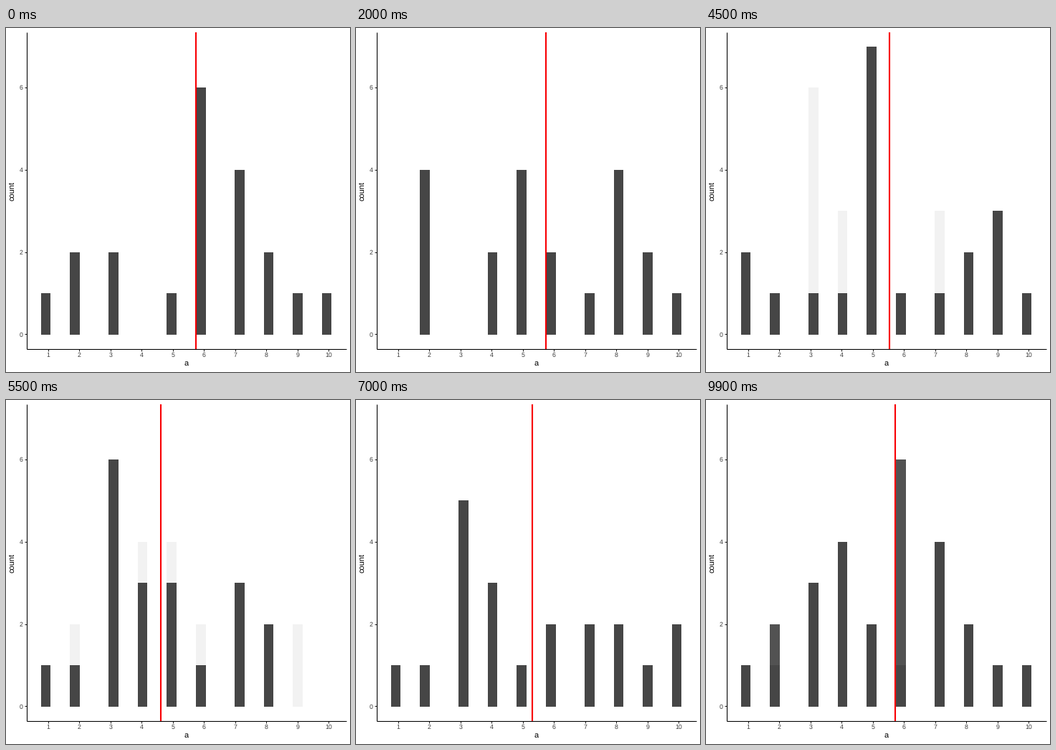
A matplotlib script for the animation above (10 s loop, 480 by 480 pixels).

```python
import math

import matplotlib.pyplot as plt
from matplotlib.animation import FuncAnimation
from matplotlib.patches import Rectangle

plt.rcParams["font.family"] = "Liberation Sans"
plt.rcParams["text.hinting"] = "none"

SIZE = 480
LEFT, RIGHT, TOP, BOTTOM = 28.5, 474.5, 5.5, 447.5
BAR, RED, LABEL, TICK = "#464646", "#f80004", "#3b3b3b", "#222222"

# Counts of the values 1 to 10 in each sample of twenty
SAMPLES = [
    (1, 2, 2, 0, 1, 6, 4, 2, 1, 1),
    (1, 2, 4, 2, 0, 1, 4, 0, 5, 1),
    (0, 4, 0, 2, 4, 2, 1, 4, 2, 1),
    (3, 1, 1, 2, 2, 1, 2, 4, 3, 1),
    (2, 1, 1, 1, 7, 1, 1, 2, 3, 1),
    (1, 1, 6, 3, 3, 1, 3, 2, 0, 0),
    (0, 2, 1, 4, 4, 2, 3, 2, 2, 0),
    (1, 1, 5, 3, 1, 2, 2, 2, 1, 2),
    (1, 2, 1, 4, 6, 1, 3, 0, 1, 1),
    (1, 1, 3, 4, 2, 1, 4, 2, 1, 1),
]
STEPS = [7, 6, 5] + [6] * 7  # length of each transition in frames
CYCLE = 10                   # frames per sample

BIN = 9 / 29
LOW, HIGH = 2.5 * BIN, 32.5 * BIN
PAD = 0.05 * (HIGH - LOW)
X_SCALE = (RIGHT - LEFT) / (HIGH - LOW + 2 * PAD)
Y_SCALE = (BOTTOM - TOP) / 7.7


def px(value):
    return LEFT + (value - LOW + PAD) * X_SCALE


def py(count):
    return BOTTOM - (count + 0.35) * Y_SCALE


def snap(v):
    return math.floor(v + 0.5)


def mean(counts):
    return sum(v * c for v, c in enumerate(counts, 1)) / sum(counts)


fig = plt.figure(figsize=(SIZE / 72, SIZE / 72), dpi=72, facecolor="white")
ax = fig.add_axes([0, 0, 1, 1])
ax.set_xlim(0, SIZE)
ax.set_ylim(SIZE, 0)
ax.axis("off")


def line(xs, ys, color, width=1.07, z=3):
    return ax.plot(xs, ys, color=color, lw=width, zorder=z,
                   solid_capstyle="butt")[0]


def make_bars(z):
    bars = []
    for value in range(1, 11):
        center = round(value / BIN) * BIN
        x0, x1 = snap(px(center - BIN / 2)), snap(px(center + BIN / 2))
        bar = Rectangle((x0, 428), x1 - x0, 0, fc=BAR, lw=0,
                        antialiased=False, zorder=z)
        bars.append(ax.add_patch(bar))
    return bars


def set_bars(bars, counts, alpha):
    for bar, count in zip(bars, counts):
        top = snap(py(count))
        bar.set_y(top)
        bar.set_height(428 - top)
        bar.set_alpha(alpha)
        bar.set_visible(count > 0 and alpha > 0)


def draw_axes():
    for value in range(1, 11):
        x = px(value)
        line([x, x], [BOTTOM, BOTTOM + 3], TICK)
        ax.text(x, 459.1, str(value), size=8.8, color=LABEL, ha="center")
    for count in (0, 2, 4, 6):
        y = py(count)
        line([LEFT - 3, LEFT], [y, y], TICK)
        ax.text(23.4, y + 3.2, str(count), size=8.8, color=LABEL, ha="right")
    line([LEFT, RIGHT], [BOTTOM, BOTTOM], "black", z=4)
    line([LEFT, LEFT], [TOP, BOTTOM], "black", z=4)
    ax.text(251.5, 472, "a", size=11, ha="center")
    ax.text(13.6, 227.5, "count", size=11, rotation=90,
            ha="right", va="center")


draw_axes()
leaving = make_bars(1)
entering = make_bars(2)
marker = line([0, 0], [TOP, BOTTOM], RED, 2.13, z=5)


def update(frame):
    k, phase = divmod(frame, CYCLE)
    old, new = SAMPLES[k], SAMPLES[(k + 1) % len(SAMPLES)]
    t = max(0, phase - CYCLE + STEPS[k]) / STEPS[k]
    ease = (1 - math.cos(math.pi * t)) / 2
    # Old bars stay solid until the new ones have fully faded in
    set_bars(leaving, old, 1)
    set_bars(entering, new, ease)
    x = px(mean(old) + (mean(new) - mean(old)) * ease)
    marker.set_xdata([x, x])
    return [*leaving, *entering, marker]


anim = FuncAnimation(fig, update, frames=CYCLE * len(SAMPLES), interval=100,
                     repeat=True, repeat_delay=0, blit=False)
plt.show()
```
